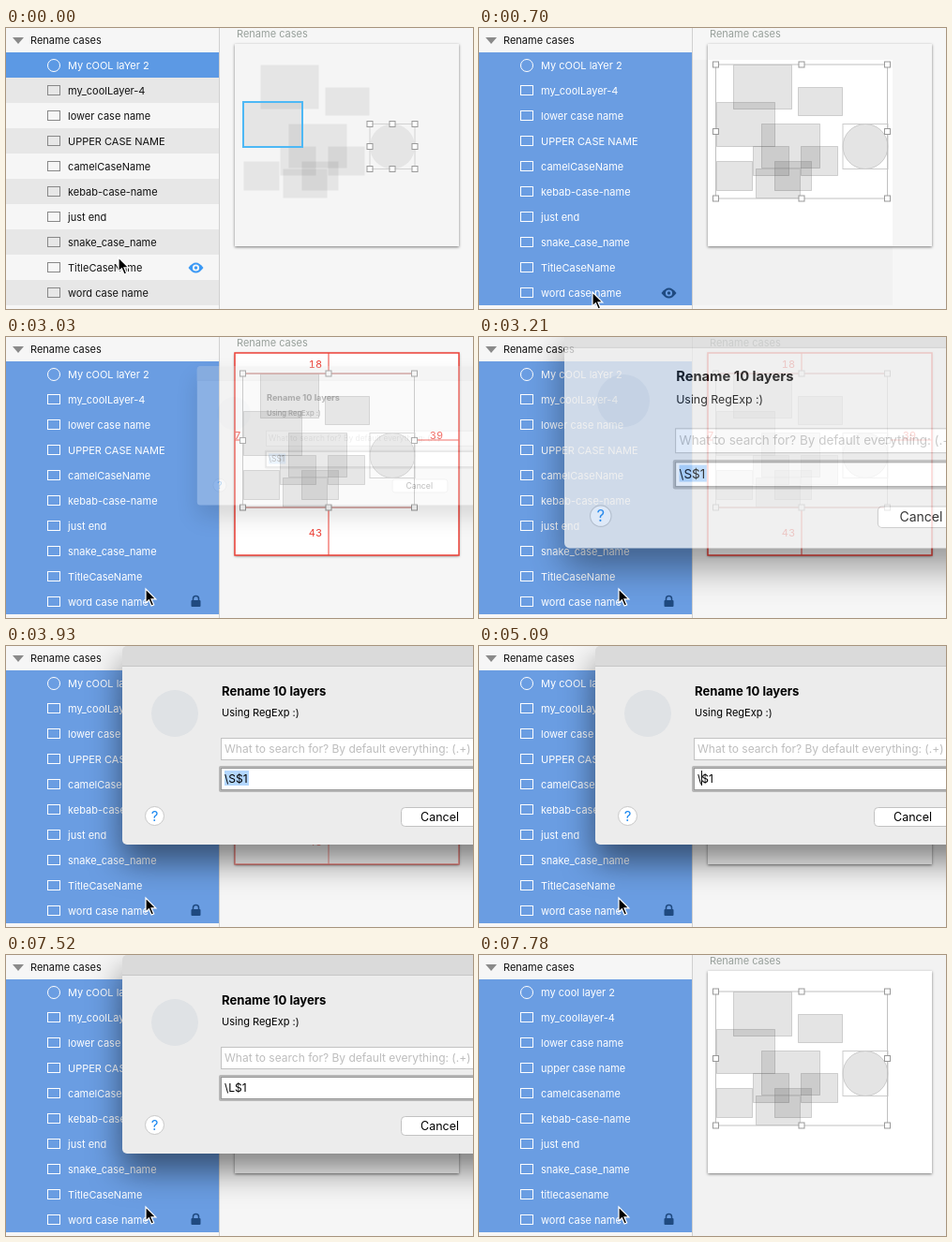
An HTML page that plays this animation: 498 by 300 pixels, repeating every 8000 ms.

```html
<!DOCTYPE html>
<html lang="en">
<head>
<meta charset="utf-8">
<title>Rename layers</title>
<style>
  html, body { margin: 0; width: 100%; height: 100%; overflow: hidden; background: #f6f6f6; }
  svg { display: block; width: 498px; height: 300px; }
  text { font: 11px Inter, Roboto, sans-serif; white-space: pre; }
  .board { filter: drop-shadow(0 1px 1.5px #777); }
  .panel { fill: #ececec; filter: drop-shadow(0 18px 17px rgba(0, 0, 0, .5)); }
  #dialog .title { font-size: 13.1px; font-weight: 700; }
  #dialog .field { font-size: 12px; }
  #ruler text { fill: #ee4238; text-anchor: middle; font-variant-numeric: tabular-nums; }
</style>
</head>
<body>
<svg viewBox="0 0 498 300">
  <rect id="canvas" x="228" width="270" height="300"/>
  <rect id="patch" x="228" y="34" width="213" height="262" fill="#f1f1f1"/>
  <text x="246" y="10" fill="#98a09b">Rename cases</text>
  <rect id="board" class="board" x="244" y="17" width="239" height="216"/>
  <rect id="boardPatch" x="244" y="34" width="197" height="199" fill="#fff"/>
  <g id="shapes"></g>
  <rect id="hover" fill="none" stroke="#4db8f5" stroke-width="2"/>
  <g id="ruler" fill="none" stroke="#ee4238">
    <path stroke-width="1.5" d="M244 17h239v216h-239z"/>
    <path d="M252.5 39h183v143h-183zM344 17v22M344 182v51M244 110h8M436 110h47"/>
    <g stroke="none">
      <text x="330" y="33">18</text><text x="330" y="213">43</text>
      <text x="459" y="109">39</text><text x="247" y="109">7</text>
    </g>
  </g>
  <g id="oneBox" fill="#fff" stroke="#999"></g>
  <g id="allBox" fill="#fff" stroke="#999"></g>

  <rect width="228" height="300" fill="#f6f6f6"/>
  <g id="stripes" fill="#e7e7e7"></g>
  <rect id="selection" y="26" width="228"/>
  <path d="M7 10h12l-6 7z" fill="#8a8a8a"/>
  <text x="26" y="17" fill="#111">Rename cases</text>
  <g id="list"></g>
  <path d="M227.5 0v300" stroke="#d0d0d0"/>
  <g id="eye">
    <path d="M-8 0Q0 -11 8 0Q0 11 -8 0z"/>
    <circle id="iris" r="3.6"/><circle r="1.7"/>
  </g>
  <g id="lock" fill="#1f4a80">
    <rect x="197.5" y="281" width="10" height="7" rx="1"/>
    <path d="M199.5 282v-2.5a3 3 0 0 1 6 0v2.5" fill="none" stroke="#1f4a80" stroke-width="1.5"/>
  </g>

  <g id="dialog">
    <rect class="panel" x="124" width="532" height="212" rx="5"/>
    <path d="M124 22V5a5 5 0 0 1 5 -5h522a5 5 0 0 1 5 5v17z" fill="#dadada"/>
    <path d="M124 21.5h532" stroke="#c6c6c6"/>
    <circle cx="180" cy="72" r="25" fill="#dfe2e5"/>
    <text class="title" x="230" y="53">Rename 10 layers</text>
    <text x="230" y="75">Using RegExp :)</text>
    <rect x="229.5" y="98.5" width="400" height="23" fill="#fff" stroke="#c2c2c2"/>
    <text class="field" x="233" y="114" fill="#bdbdbd">What to search for? By default everything: (.+)</text>
    <rect x="227" y="128" width="405" height="28" rx="2" fill="#b6b6b6"/>
    <rect x="229.5" y="130.5" width="400" height="23" fill="#fff" stroke="#989898"/>
    <rect id="marked" x="233" y="133" width="26" height="16" fill="#b3d7fe"/>
    <text id="pattern" class="field" x="233" y="146"></text>
    <path id="caret" d="M.5 133v16" stroke="#111"/>
    <circle cx="158.5" cy="181.5" r="10" fill="#fff" stroke="#c8c8c8"/>
    <text x="158.5" y="187" text-anchor="middle" fill="#1a87f0" style="font-size:15px">?</text>
    <rect x="421.5" y="172.5" width="84" height="20" rx="4" fill="#fff" stroke="#c2c2c2"/>
    <text x="442" y="187" style="font-size:12.5px">Cancel</text>
  </g>
  <path id="cursor" d="M0 0v15l3.4-3.2 2.7 6.2 2.6-1.1-2.7-6h4.8z" stroke="#fff" stroke-width="1.2"/>
</svg>
<script>
const $ = id => document.getElementById(id);
const set = (id, attrs) => { for (const k in attrs) $(id).setAttribute(k, attrs[k]); };
const show = (id, on) => set(id, { display: on ? 'inline' : 'none' });

const names = ['My cOOL laYer 2', 'my_coolLayer-4', 'lower case name', 'UPPER CASE NAME', 'camelCaseName',
  'kebab-case-name', 'just end', 'snake_case_name', 'TitleCaseName', 'word case name'];
const boxes = [[271, 39, 63, 48], [340, 63, 48, 31], [253, 79, 63, 48], [301, 102, 63, 48], [292, 126, 39, 32],
  [343, 126, 40, 32], [253, 142, 39, 32], [315, 142, 40, 32], [295, 150, 48, 32]];

$('list').innerHTML = names.map((name, i) => {
  const y = 40 + 27 * i;
  const icon = i ? `<rect x="44.5" y="${y - 5.5}" width="13" height="10"` : `<circle cx="51" cy="${y}" r="6.5"`;
  return `<g>${icon} fill="none"/><text x="66" y="${y + 4}"></text></g>`;
}).join('');
const rows = [...$('list').children];

$('stripes').innerHTML = [1, 3, 5, 7, 9].map(i => `<rect y="${26 + 27 * i}" width="228" height="27"/>`).join('');

$('shapes').innerHTML = boxes.map(([x, y, w, h]) =>
  `<rect x="${x + .5}" y="${y + .5}" width="${w - 1}" height="${h - 1}"/>`).join('') +
  '<circle cx="412" cy="126.5" r="24"/>';

function handles(id, x, y, w, h, line) {
  let out = `<rect x="${x}" y="${y}" width="${w}" height="${h}" fill="none" stroke="${line}"/>`;
  for (const i of [0, .5, 1]) for (const j of [0, .5, 1])
    if (i !== .5 || j !== .5)
      out += `<rect x="${x + w * i - 3}" y="${y + h * j - 3}" width="6" height="6"/>`;
  $(id).innerHTML = out;
}
handles('oneBox', 388, 102.5, 48, 48, '#d2d2d2');
handles('allBox', 252.5, 39, 183, 143, '#c0c0c0');
$('allBox').insertAdjacentHTML('afterbegin',
  '<rect x="388" y="102.5" width="48" height="48" fill="none" stroke="#ccc"/>');

// Latest entry [time, value] already reached
const at = (t, keys) => keys.reduce((v, [start, next]) => t >= start ? next : v, keys[0][1]);

const pointer = [[0, [120, 245]], [90, [120, 252]], [180, [120, 262]], [270, [121, 274]], [350, [121, 282]],
  [970, [128, 279]], [1060, [141, 273]], [1150, [149, 269]]];
// Dialog scale and opacity
const pop = [[0, [1, 0]], [3030, [.7, .25]], [3120, [.95, .5]], [3210, [1.124, .78]], [3300, [1.04, .95]],
  [3390, [1, 1]], [7690, [1, .4]], [7780, [1, 0]]];
const typed = [[0, '\\S$1'], [5090, '\\$1'], [5540, '\\L$1']];
// Caret x, 0 when off
const carets = [[0, 0], [4370, 233], [4460, 237], [4640, 244], [5090, 237], [5540, 243], [6170, 0], [6710, 243],
  [6980, 257], [7520, 0]];

function draw(t) {
  const all = t >= 700, locked = t >= 1780, done = t >= 7780, low = t >= 270;

  set('canvas', { fill: done ? '#f2f2f2' : '#f6f6f6' });
  set('board', { fill: locked ? '#fff' : '#f5f5f5' });
  show('patch', all && !locked);
  show('boardPatch', all && !locked);
  set('shapes', { 'fill-opacity': all ? .105 : .065, stroke: all ? 'rgba(120,120,120,.3)' : 'none' });
  show('oneBox', !all);
  show('allBox', all);
  show('hover', !all);
  const [x, y, w, h] = boxes[low ? 0 : 2];
  set('hover', { x, y, width: w, height: h });
  show('ruler', locked && t < 4010);
  set('ruler', { opacity: t < 3930 ? 1 : .6 });

  set('selection', { height: all ? 270 : 27, fill: all ? '#6a9de2' : '#5c99e4' });
  rows.forEach((row, i) => {
    const on = all || !i, [icon, label] = row.children;
    icon.setAttribute('stroke', on ? '#fff' : '#888');
    label.setAttribute('fill', on ? '#fff' : '#111');
    label.textContent = done ? names[i].toLowerCase() : names[i];
  });
  show('eye', !locked);
  set('eye', { transform: `translate(202.5 ${low ? 283 : 256})`, fill: all ? '#1f4a80' : '#3b99f5' });
  set('iris', { fill: all ? '#6a9de2' : low ? '#e7e7e7' : '#f6f6f6' });
  show('lock', locked);

  const [scale, opacity] = at(t, pop);
  show('dialog', opacity > 0);
  set('dialog', { opacity, transform: `translate(390 104) scale(${scale}) translate(-390 -104)` });
  show('marked', t < 4370);
  $('pattern').textContent = at(t, typed);
  const caret = at(t, carets);
  show('caret', caret);
  set('caret', { transform: `translate(${caret})` });
  set('cursor', { transform: `translate(${at(t, pointer)})` });
}

const start = performance.now();
function tick() {
  draw((performance.now() - start) % 8000);
  requestAnimationFrame(tick);
}
tick();
</script>
</body>
</html>
```
